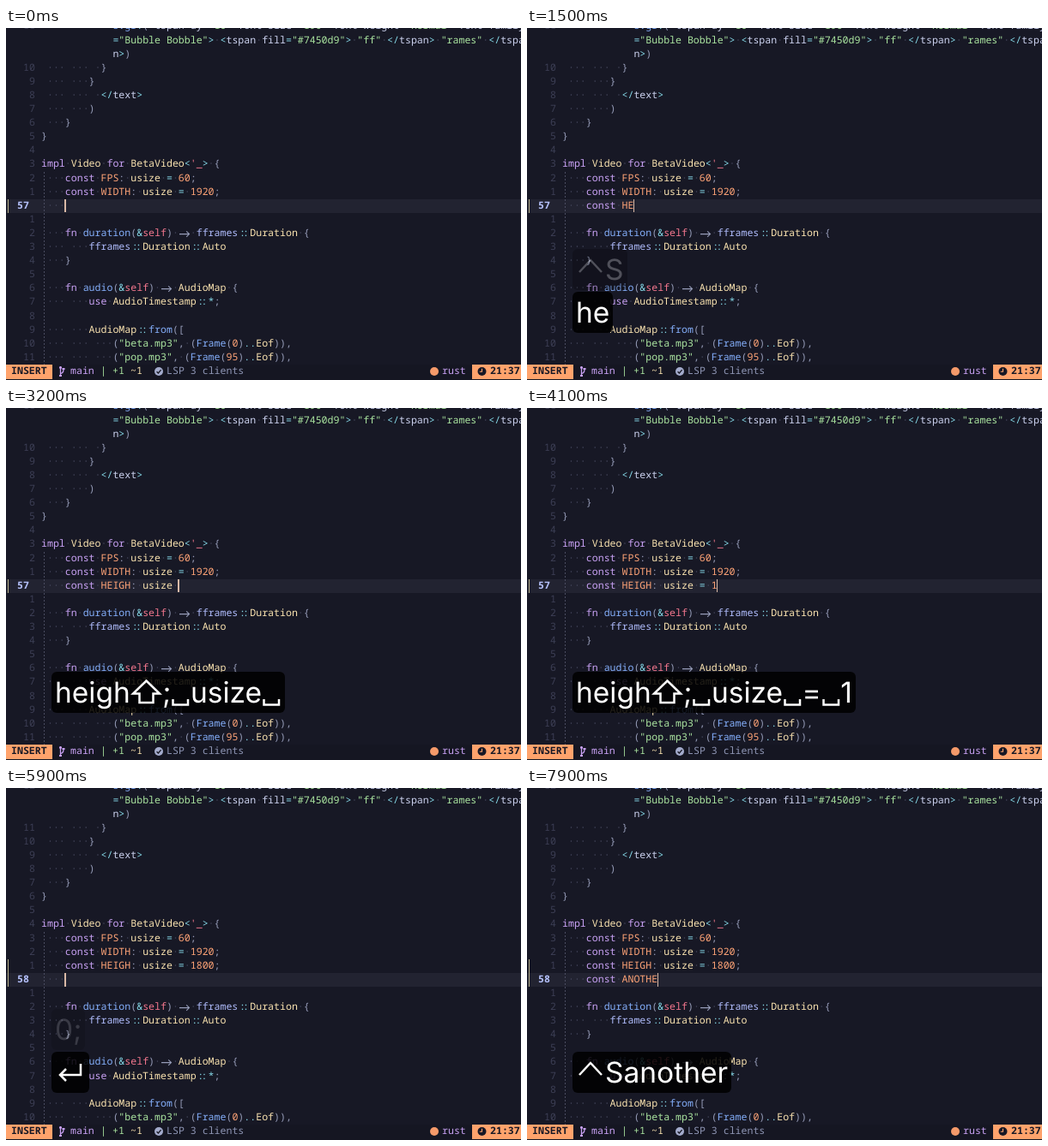
These frames come from a looping animation (600x411 px, 8 s). An HTML page:

```html
<!DOCTYPE html>
<html lang="en">
<head>
<meta charset="utf-8">
<title>Typing constants in a code editor</title>
<style>
  html, body { margin: 0; width: 100%; height: 100%; overflow: hidden; background: #171825; }
  #stage {
    position: relative; width: 600px; height: 411px; overflow: hidden;
    background: #171825; color: #cdd3f0;
    font: 11.58px/16.1px "Noto Sans Mono", "DejaVu Sans Mono", monospace;
    text-rendering: geometricPrecision;
  }
  #stage div, #stage span { position: absolute; white-space: pre; }
  #code, #overlay { left: 0; top: 0; width: 600px; height: 411px; }
  .row { left: 0; width: 600px; height: 16.1px; }
  .row.now { background: #222331; }
  .num { right: 566px; color: #3d3f55; }
  .now .num { right: auto; left: 13px; color: #b4c0fa; font-weight: 600; }
  .kw { color: #c9a2f5; } .fn { color: #84aefa; } .ty { color: #fae3b0; }
  .con { color: #ffa477; } .str { color: #abe5a0; } .op { color: #86d9e8; }
  .red { color: #f5788f; } .mod { color: #b0bcfc; } .pun { color: #969cb8; }
  .dot { color: #44465c; }
  .pair { letter-spacing: -2.8px; margin-left: 1.6px; }
  .guide { left: 44px; top: 168px; width: 1px; height: 225px;
    background: repeating-linear-gradient(#4a4c60 0 2px, transparent 2px 4px); }
  .sign { left: 1.5px; top: 200px; width: 1.4px; background: #b9b18d; }
  .caret { width: 1.2px; height: 15.6px; background: #d9b9a6; }
  .bar { left: 0; top: 393px; width: 600px; height: 18px; background: #151622; }
  .bar span { top: .2px; }
  .bar svg { position: absolute; left: 0; top: 0; }
  .chip { top: 0; height: 16.5px; background: #ffa36c; }
  .dark { color: #171825; font-weight: 700; }
  .keys {
    left: 53px; height: 48px; padding: 0 4px; border-radius: 6px;
    background: rgba(0, 0, 0, .86); color: #fff;
    font: 33.5px/51.5px Inter, "Liberation Sans", sans-serif;
  }
  .keys svg { height: 48px; vertical-align: top; fill: none; stroke: #fff; stroke-width: 2.5; }
</style>
</head>
<body>
<div id="stage">
  <div id="code"></div>
  <div class="guide"></div>
  <div class="sign" id="sign"></div>
  <div class="caret" id="caret"></div>
  <div class="bar">
    <div class="chip" style="left:0;width:54px"></div>
    <div class="chip" style="left:543px;width:57px"></div>
    <svg width="600" height="18" fill="none">
      <g stroke="#c9a2f5" stroke-width="1.3">
        <path d="M63.5 2V14M63.5 10.5Q67 10 67 5.5"/>
        <path d="M62 3.5H65M62 13H65M65.5 5H68.5" stroke-width="2"/>
      </g>
      <circle cx="178" cy="8" r="5" fill="#a3abcc"/>
      <path d="M175.6 8.2L177.4 10 180.6 6.2" stroke="#151622" stroke-width="1.3"/>
      <circle cx="499" cy="8" r="5" fill="#f59a6a"/>
      <circle cx="554.5" cy="8" r="5" fill="#171825"/>
      <path d="M554.5 4.8V8.2H551.8" stroke="#ffa36c" stroke-width="1.1"/>
    </svg>
    <span class="dark" style="left:6px">INSERT</span>
    <span class="kw" style="left:75px">main</span>
    <span class="str" style="left:110px">|</span>
    <span class="str" style="left:124px">+1</span>
    <span class="ty" style="left:145px">~1</span>
    <span style="left:187px;color:#8f96b5">LSP 3 clients</span>
    <span class="kw" style="left:508px">rust</span>
    <span class="dark" style="left:564px">21:37</span>
  </div>
  <div id="overlay"></div>
</div>
<script>
const LOOP = 8000, CELL = 6.95, ROW = 16.1, LEFT = 41, TOP = 151.4;
const HOLD = 450, FADE = 200;

// A leading "~" marks the continuation of a wrapped line.
const above = [
  '            svgr!(<tspan dy="10" font-size="190" font-weight="normal" font-family',
  '~            ="Bubble Bobble"> <tspan fill="#7450d9"> "ff" </tspan> "rames" </tspa',
  '~            n>)',
  '          }', '        }', '          </text>', '        )', '    }', '}', '',
  "impl Video for BetaVideo<'_> {",
  '    const FPS: usize = 60;',
  '    const WIDTH: usize = 1920;'
];
const below = [
  '',
  '    fn duration(&self) -> fframes::Duration {',
  '        fframes::Duration::Auto',
  '    }', '',
  '    fn audio(&self) -> AudioMap {',
  '        use AudioTimestamp::*;', '',
  '        AudioMap::from([',
  '            ("beta.mp3", (Frame(0)..Eof)),',
  '            ("pop.mp3", (Frame(95)..Eof)),'
];

// time, key shown, text added to the line
const presses = [
  [280, 'c', 'c'], [380, 'o', 'o'], [480, 'n', 'n'], [900, '^S', 'st '],
  [1380, 'h', 'H'], [1480, 'e', 'E'], [1680, 'i', 'I'], [1830, 'g', 'G'], [1980, 'h', 'H'],
  [2180, '⇧;', ':'], [2280, '␣', ' '],
  [2480, 'u', 'u'], [2630, 's', 's'], [2740, 'i', 'i'], [2840, 'z', 'z'], [2980, 'e', 'e'],
  [3130, '␣', ' '], [3330, '=', '='], [3530, '␣', ' '],
  [3880, '1', '1'], [4140, '8', '8'], [4290, '0', '0'],
  [4880, '0', '0'], [5280, ';', ';'], [5880, '⏎', '\n'],
  [6560, 'c', 'c'], [6660, 'o', 'o'], [6780, 'n', 'n'], [6980, '^S', 'st '],
  [7240, 'a', 'A'], [7350, 'n', 'N'], [7450, 'o', 'O'], [7550, 't', 'T'],
  [7650, 'h', 'H'], [7760, 'e', 'E'], [7870, 'r', '']
];

// A pause or a control chord opens a new key box.
const groups = [];
presses.forEach((p, i) => {
  if (!i || p[0] - presses[i - 1][0] >= HOLD || p[1][0] === '^') groups.push([]);
  groups[groups.length - 1].push(p);
});

const symbols = {
  '^': [34, 'M4 27L17 13 30 27'],
  '⇧': [37.5, 'M18.5 10.5L34 25.5H26.5V36H10.5V25.5H3Z'],
  '␣': [22.5, 'M2.5 32V38.5H20V32'],
  '⏎': [36, 'M30 14V27H6M13 20L6 27 13 34']
};
const $ = id => document.getElementById(id);
const escapeHtml = s => s.replace(/&/g, '&amp;').replace(/</g, '&lt;');
const keyHtml = s => [...s].map(c => {
  if (!symbols[c]) return escapeHtml(c);
  const [w, d] = symbols[c];
  return `<svg width="${w}" viewBox="0 0 ${w} 48"><path d="${d}"/></svg>`;
}).join('');

function wordClass(word, before) {
  if (/^(impl|for|const|fn|use)$/.test(word)) return 'kw';
  if (word === 'self') return 'red';
  if (word === 'fframes') return 'mod';
  if (/fn $/.test(before) || /^(from|svgr|Frame)$/.test(word)) return 'fn';
  if (/^[A-Z_]+$/.test(word)) return 'con';
  if (/^[A-Z]/.test(word) || /: $/.test(before)) return 'ty';
  return '';
}

const token = /("[^"]*"?)|(->|::|\.\.|<\/|[=<>&*!])|('_)|([A-Za-z_]\w*)|(\d+)|( )|./g;

function lineHtml(text, wrapped) {
  const indent = text.search(/\S|$/);
  let out = '';
  for (const m of text.matchAll(token)) {
    const [all, str, op, life, word, num, space] = m, col = m.index;
    let cls = str ? 'str' : op ? 'op' : life ? 'red' : num ? 'con' : 'pun', body = escapeHtml(all);
    if (word) cls = wordClass(word, text.slice(0, col));
    if (space) {
      if (col < indent && (wrapped || col % 4 === 0)) continue;
      cls = 'dot';
      body = '·';
    }
    if (op === '::') cls += ' pair';
    if (op === '->') {
      body = '<svg width="14" height="16" fill="none" stroke="currentColor" stroke-width="1.1">' +
        '<path d="M1 8.6H12.5M9.2 5.4L12.5 8.6 9.2 11.8"/></svg>';
      cls = 'pun';
    }
    out += `<span class="${cls}" style="left:${(LEFT + col * CELL).toFixed(2)}px">${body}</span>`;
  }
  return out;
}

function drawCode(typed) {
  const parts = typed.split('\n').map(s => '    ' + s);
  const current = parts.pop();
  const head = above.concat(parts);
  const rows = [...head, current, ...below];
  const now = head.length, first = -10;
  let html = '';
  rows.forEach((raw, i) => {
    const wrapped = raw[0] === '~';
    const gap = i < now
      ? rows.slice(i, now).filter(s => s[0] !== '~').length
      : i - now;
    const label = wrapped ? '' : gap || 57 + parts.length;
    html += `<div class="row${i === now ? ' now' : ''}" style="top:${(TOP + (i + first) * ROW).toFixed(2)}px">` +
      `<span class="num">${label}</span>${lineHtml(wrapped ? raw.slice(1) : raw, wrapped)}</div>`;
  });
  $('code').innerHTML = html;
  $('sign').style.height = 16 * (parts.length + 1) + 'px';
  $('caret').style.left = LEFT + current.length * CELL - .4 + 'px';
  $('caret').style.top = TOP + (now + first) * ROW + .2 + 'px';
}

const boxes = groups.map(() => {
  const box = document.createElement('div');
  box.className = 'keys';
  $('overlay').append(box);
  return box;
});

function drawKeys(t) {
  const opened = groups.filter(g => g[0][0] <= t).length;
  groups.forEach((group, i) => {
    const done = group.filter(p => p[0] <= t);
    const box = boxes[i];
    const age = done.length ? t - done[done.length - 1][0] : Infinity;
    const alpha = Math.max(0, Math.min(1, 1 - (age - HOLD) / FADE));
    box.style.display = alpha ? 'block' : 'none';
    if (!alpha) return;
    box.style.opacity = alpha;
    box.style.top = 308 - 50 * (opened - 1 - i) + 'px';
    const keys = done.map(p => p[1]).join('');
    if (box.dataset.keys !== keys) {
      box.dataset.keys = keys;
      box.innerHTML = keyHtml(keys);
    }
  });
}

let shown = null;
function draw() {
  const t = performance.now() % LOOP;
  const typed = presses.filter(p => p[0] <= t).map(p => p[2]).join('');
  if (typed !== shown) drawCode(shown = typed);
  drawKeys(t);
  requestAnimationFrame(draw);
}
draw();
</script>
</body>
</html>
```
